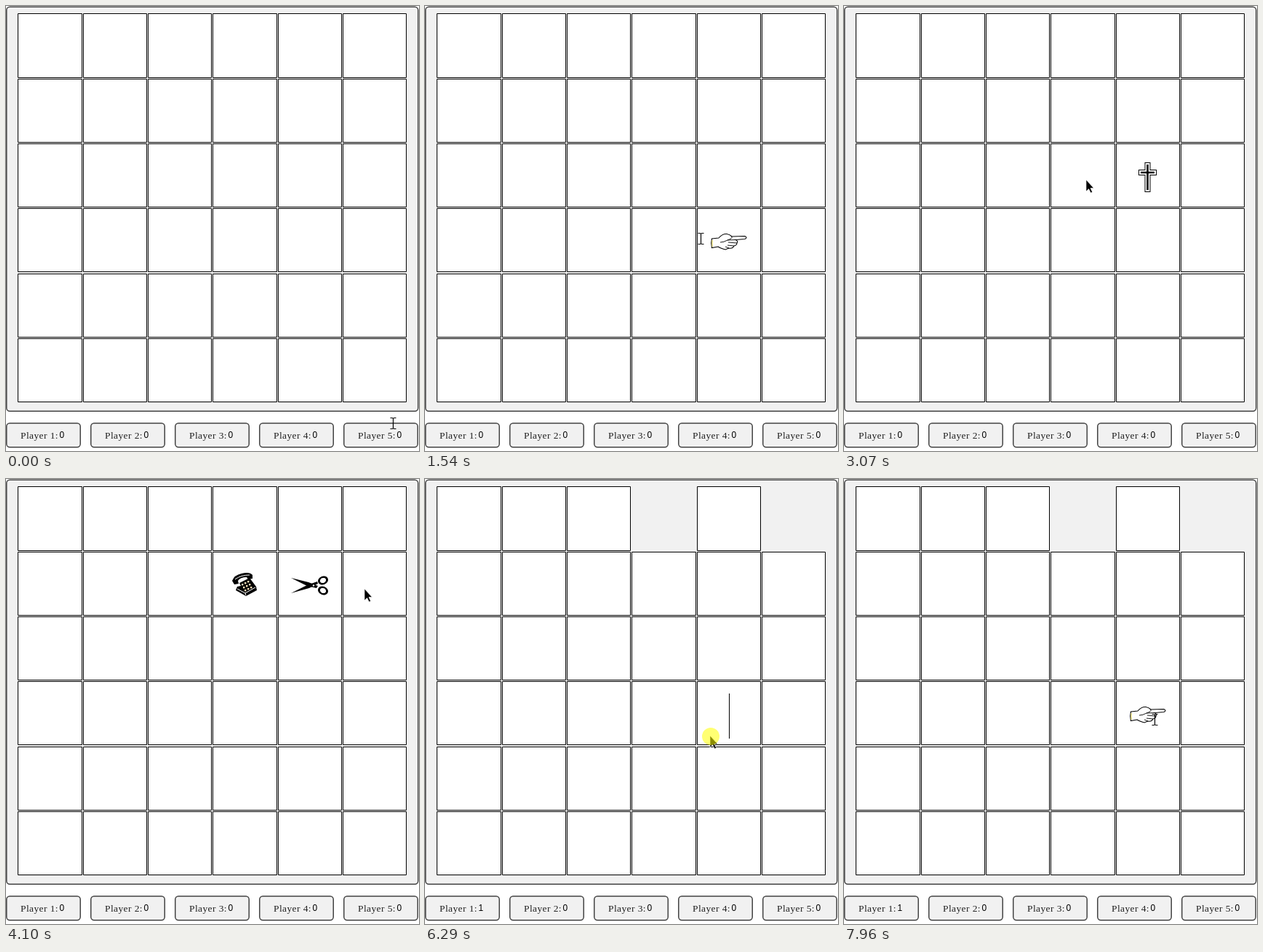
Write an HTML page with a canvas that moves like this. It is 568 px wide and 612 px high and loops after 8000 ms.

```html
<!DOCTYPE html>
<html lang="en">
<head>
<meta charset="utf-8">
<title>Memory game</title>
<style>
html, body { margin: 0; width: 568px; height: 612px; overflow: hidden; background: #fff; }
canvas { display: block; }
</style>
</head>
<body>
<canvas id="stage" width="568" height="612"></canvas>
<script>
const LOOP = 8000;
const MATCH = 4800;
const ctx = document.getElementById('stage').getContext('2d');

// Pointer: time, x, y, optional rest
const pointer = [
  [0, 532, 574, 50], [200, 414, 477], [400, 410, 492], [640, 332, 410], [810, 354, 350],
  [910, 351, 327, 180], [1360, 404, 318], [1540, 379, 320], [1660, 345, 323],
  [1890, 475, 325], [2080, 508, 325], [2400, 505, 238], [2630, 450, 240, 140],
  [3070, 333, 239], [3170, 326, 238, 200], [3500, 325, 150, 140], [4100, 493, 151],
  [4210, 503, 152], [4440, 500, 65], [4700, 329, 58], [4920, 50, 209, 80],
  [5290, 134, 306, 90], [5700, 150, 412], [5850, 165, 450], [5960, 205, 440],
  [6140, 276, 420], [6270, 392, 353, 150], [6880, 143, 424, 140], [7400, 290, 370],
  [7600, 408, 292], [7720, 417, 341, 140], [7950, 427, 331]
];

// Times with the text pointer
const beams = [[0, 430], [600, 800], [900, 1700], [2000, 2500], [7580, LOOP]];

const quickPresses = [390, 590, 1320, 1620, 2050, 2360, 2860, 3870, 4170, 4490, 4650];
const heldPresses = [
  [3160, 3380], [3490, 3680], [4860, 5010], [5280, 5400], [5650, 5750],
  [6230, 6390], [6870, 7030], [7710, 7870]
];

// Row, column, symbol, shown from, shown until
const reveals = [
  [5, 4, 'letter', 430, 1100], [4, 3, 'clock', 650, 1100],
  [3, 4, 'hand', 1400, 2000], [3, 3, 'flag', 1680, 2000],
  [3, 5, 'clock', 2120, 2800], [2, 5, 'phone', 2430, 2800],
  [2, 4, 'cross', 2930, 3420], [2, 3, 'flag', 3170, 3420],
  [1, 3, 'phone', 3680, 4260], [1, 4, 'scissors', 3930, 4260],
  [1, 5, 'flag', 4240, 4500],
  [0, 5, 'letter', 4520, MATCH], [0, 3, 'letter', 4700, MATCH],
  [2, 0, 'clock', 5010, 5280],
  [3, 1, 'cross', 5400, 6200], [4, 1, 'flag', 5730, 6200],
  [3, 4, 'hand', 7880, LOOP]
];

// Row, column, from, until
const carets = [
  [2, 0, 4900, 5010], [3, 1, 5290, 5400], [3, 4, 6260, 6880],
  [4, 1, 6880, 7640], [3, 4, 7710, 7880]
];

const during = (t, from, to) => t >= from && t < to;
const cardX = col => Math.round(16.2 + 89.4 * col);
const cardY = row => Math.round(10.1 + 89.4 * row);

function shape(d, fill, stroke, width = 1) {
  const path = new Path2D(d);
  if (fill) { ctx.fillStyle = fill; ctx.fill(path); }
  if (stroke) { ctx.strokeStyle = stroke; ctx.lineWidth = width; ctx.stroke(path); }
}

function disc(x, y, r, fill, stroke, width) {
  shape(`M${x - r} ${y}a${r} ${r} 0 1 0 ${2 * r} 0a${r} ${r} 0 1 0 ${-2 * r} 0z`, fill, stroke, width);
}

// Symbols are drawn around the middle of their card
const symbols = {
  hand() {
    shape('M-23.5 -2L-14 -3Q-9 -9 -3 -8.5Q1 -8 4 -5L22 -5.5Q26 -3.5 22 -1.5L9 -.5Q13 1 11 4Q11 7 7 8Q5 12 0 11L-5 13Q-12 11 -15 9L-23.5 10.5Q-25 4 -23.5 -2Z', '#fff', '#000', 1.1);
    shape('M9 -.5L-2 0Q-7 3 -12 3M-2 0Q5 -2 4 -5M11 4L-1 3M7 8L-2 7M0 11L-5 9', null, '#000', .9);
    shape('M-23 0V9', null, '#e5d64a');
  },
  cross() {
    shape('M-.5 -18V23M-13 -4H12', null, '#000', 8);
    shape('M-.5 -17V22M-12 -4H11', null, '#fff', 6);
    shape('M-.5 -15V20M-10 -4H9', null, '#000', 2.6);
  },
  phone() {
    shape('M-17 -4Q-14 -12 -4 -14Q7 -17 11 -12V-7L5 -6L3 -9Q-6 -9 -9 -4L-8 0L-14 1Z', '#000');
    shape('M-7 -1L7 -8L16 4L17 9L2 17L-12 9L-10 4L-5 3Z', '#000');
    shape('M-13 -6Q-5 -12 7 -12M-10 7L1 13L2 16M1 13L15 5', null, '#fff');
    ctx.fillStyle = '#f5dfb8';
    for (let i = 0; i < 9; i++) {
      const a = i % 3, b = (i - a) / 3;
      ctx.fillRect(-4 + a * 4 + b * 2, -a * 2 + b * 4, 2.4, 2.4);
    }
  },
  scissors() {
    shape('M-26 -8L-2 -2L11 3L9 6L-4 3Z', '#000');
    shape('M-26 13L-4 2L10 -3L11 0L-1 6Z', '#000');
    for (const side of [-1, 1]) {
      ctx.save();
      ctx.translate(18, 2.5 + 7 * side);
      ctx.rotate(.4 * side);
      ctx.scale(1.25, 1);
      disc(0, 0, 4.6, '#fff', '#000', 2.4);
      ctx.restore();
    }
    disc(5, 2.5, 1.2, '#fff');
  },
  letter() {
    shape('M-19 -11H19V14H-19ZL0 4L19 -11M-19 14L-5 0M19 14L5 0', '#fff', '#000', 1.4);
  },
  clock() {
    disc(0, 2, 17, '#fff', '#000', 2);
    shape('M0 -9V2L8 7', null, '#000', 2);
  },
  flag() {
    shape('M-18 -16V22', null, '#000', 2.4);
    shape('M-17 -14Q-8 -20 1 -14T19 -14V5Q10 10 1 5T-17 5Z', '#000');
  }
};

function panel(x, y, w, h) {
  ctx.beginPath();
  ctx.roundRect(x, y, w, h, 4.5);
  ctx.fillStyle = '#f1f1f1';
  ctx.fill();
  ctx.strokeStyle = '#444';
  ctx.lineWidth = 1.5;
  ctx.stroke();
}

function drawBoard(t) {
  panel(.75, 1.25, 566, 556);
  ctx.lineWidth = 1;
  ctx.strokeStyle = '#000';
  ctx.fillStyle = '#fff';
  for (let row = 0; row < 6; row++) {
    for (let col = 0; col < 6; col++) {
      const gone = t >= MATCH && row === 0 && (col === 3 || col === 5);
      if (gone) continue;
      const narrow = col === 1 || col === 2 || col > 3;
      ctx.beginPath();
      ctx.rect(cardX(col) + .5, cardY(row) + .5, narrow ? 87 : 88, row ? 87 : 88);
      ctx.fill();
      ctx.stroke();
    }
  }
}

function drawScores(t) {
  for (let i = 0; i < 5; i++) {
    const x = 116 * i;
    panel(x + .75, 573.75, 101.5, 33);
    ctx.fillStyle = '#222';
    ctx.font = '13.5px "Liberation Serif", serif';
    ctx.letterSpacing = '0.4px';
    ctx.fillText(`Player ${i + 1}:`, x + 20, 595);
    ctx.fillStyle = '#000';
    ctx.font = '12px "Liberation Sans", sans-serif';
    ctx.letterSpacing = '0px';
    ctx.fillText(i === 0 && t >= MATCH ? '1' : '0', x + 73.5, 594);
  }
}

function pointerAt(t) {
  const next = pointer.findIndex(p => p[0] > t);
  if (next < 0) return pointer[pointer.length - 1].slice(1, 3);
  const [t0, x0, y0, rest = 0] = pointer[next - 1];
  const [t1, x1, y1] = pointer[next];
  const k = Math.max(0, (t - t0 - rest) / (t1 - t0 - rest));
  return [Math.round(x0 + (x1 - x0) * k), Math.round(y0 + (y1 - y0) * k)];
}

function drawPointer(t) {
  ctx.save();
  ctx.translate(...pointerAt(t));
  if (beams.some(b => during(t, ...b))) {
    for (const side of [-1, 1]) {
      ctx.save();
      ctx.translate(.5, 0);
      ctx.scale(side, 1);
      shape('M4 -7.5H1.5Q0 -7.5 0 -6V6Q0 7.5 1.5 7.5H4', null, '#000', 1.1);
      ctx.restore();
    }
  } else {
    shape('M0 0V16L3.6 12.6L6.3 18L8.6 16.9L6 11.6H10.5Z', '#000', '#fff', .6);
  }
  const pressed = quickPresses.some(p => during(t, p, p + 95)) || heldPresses.some(p => during(t, ...p));
  if (pressed) disc(1, 1, 12, 'rgba(255,255,0,.55)');
  ctx.restore();
}

function draw(t) {
  ctx.fillStyle = '#fff';
  ctx.fillRect(0, 0, 568, 612);
  drawBoard(t);
  drawScores(t);
  for (const [row, col, name, from, to] of reveals) {
    if (!during(t, from, to)) continue;
    ctx.save();
    ctx.translate(cardX(col) + 44, cardY(row) + 44);
    symbols[name]();
    ctx.restore();
  }
  ctx.fillStyle = '#000';
  for (const [row, col, from, to] of carets) {
    if (during(t, from, to)) ctx.fillRect(cardX(col) + (col ? 44 : 45), cardY(row) + 17, 1, 62);
  }
  drawPointer(t);
}

const start = performance.now();
function tick() {
  draw((performance.now() - start) % LOOP);
  requestAnimationFrame(tick);
}
tick();
</script>
</body>
</html>
```
